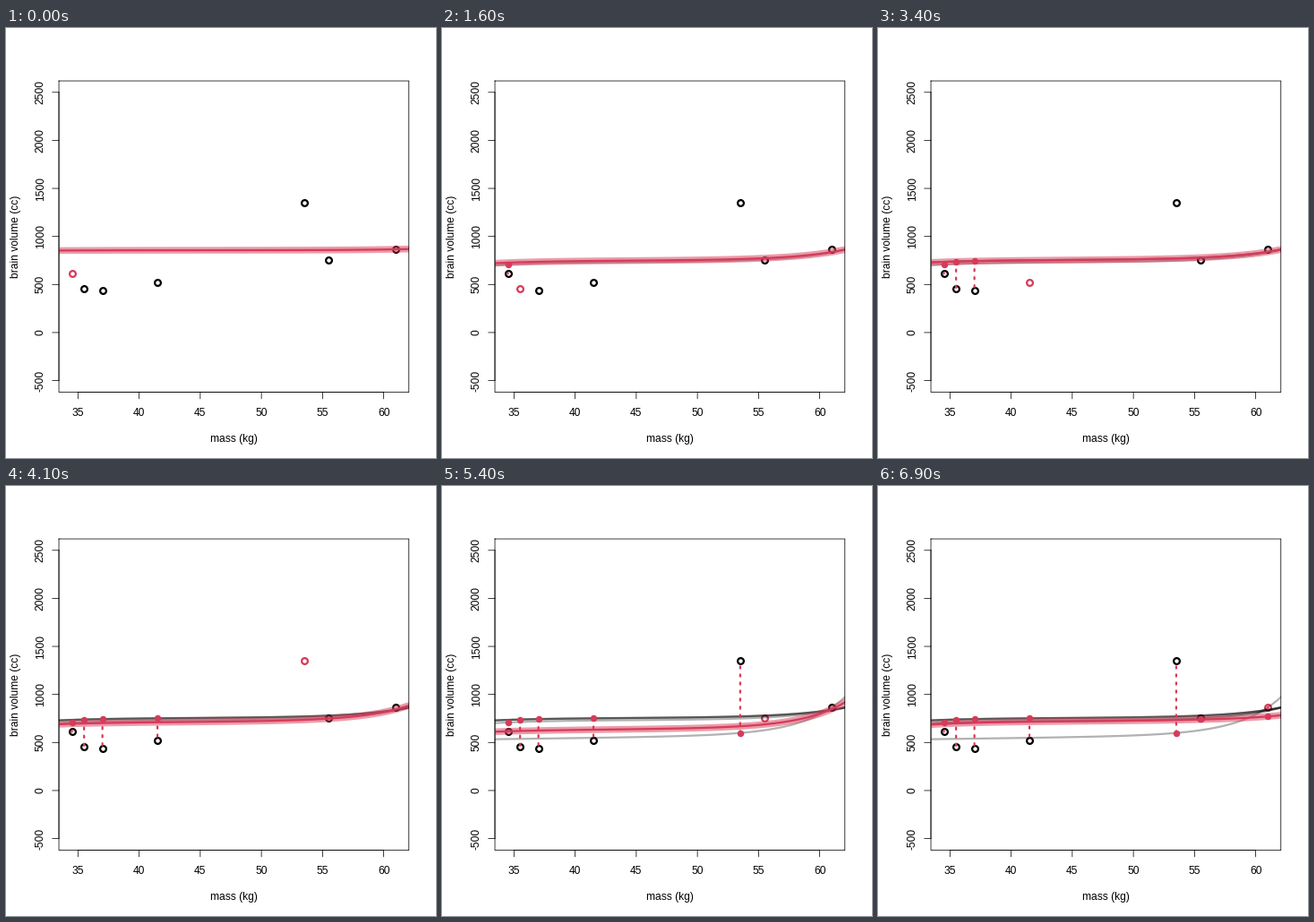
Write a matplotlib script that moves like this. It is 480 px wide and 480 px high and loops after 7 s.

```python
import matplotlib.pyplot as plt
import numpy as np
from matplotlib.animation import FuncAnimation
from matplotlib.patches import Rectangle

plt.rcParams["font.family"] = ["Liberation Sans", "DejaVu Sans"]

SIZE, DPI = 480, 80
PT = 72 / DPI                      # points per pixel
RED = "#d63b59"
THIN, THICK, BAND = 0.75, 2.25, 7.5
LEFT, RIGHT, TOP, BOTTOM = 59.04, 449.76, 59.04, 406.56
TICK = 7.2
X0, X1 = 33.44, 62.06
STEPS = 10                         # frames spent on each left-out point

MASS = [34.5, 35.5, 37, 41.5, 53.5, 55.5, 61]
BRAIN = [612, 452, 438, 521, 1350, 752, 871]

# start level, early bend, slope, tail height, tail width
FITS = [
    (701, 29, 0.2, 126, 4.1),
    (730, 21, 0.4, 102, 4.1),
    (730, 21, 0.4, 102, 4.1),
    (729, 20, 0.4, 103, 4.1),
    (534, 0, 1.7, 390, 3.4),
    (690, 28, 0.3, 138, 3.8),
    (686, 28, 0.6, 52, 4.3),
]


def px(mass):
    return LEFT + (np.asarray(mass) - X0) * (RIGHT - LEFT) / (X1 - X0)


def py(volume):
    return 339.94 - 0.10726 * np.asarray(volume)


def fit(i, x):
    level, bend, slope, tail, width = FITS[i]
    d = x - X0
    return (level + bend * (1 - np.exp(-d / 4)) + slope * d
            + tail * np.exp((x - X1) / width))


fig = plt.figure(figsize=(SIZE / DPI, SIZE / DPI), dpi=DPI, facecolor="white")
ax = fig.add_axes([0, 0, 1, 1])
ax.set_xlim(0, SIZE)
ax.set_ylim(SIZE, 0)
ax.axis("off")
plot_area = Rectangle((LEFT, TOP), RIGHT - LEFT, BOTTOM - TOP,
                      transform=ax.transData)


def stroke(xs, ys, width, color="black", **kw):
    return ax.plot(xs, ys, color=color, lw=width * PT, snap=False, **kw)[0]


def curve(ys, width, color="black", **kw):
    line = stroke(px(grid), py(ys), width, color, **kw)
    line.set_clip_path(plot_area)
    return line


def label(x, y, text, angle=0):
    ax.text(x, y, text, fontsize=12 * PT, rotation=angle, ha="center",
            va="baseline", rotation_mode="anchor")


# Box, axes and labels
stroke([LEFT, RIGHT, RIGHT, LEFT, LEFT],
       [TOP, TOP, BOTTOM, BOTTOM, TOP], THIN, zorder=9)
stroke(px([35, 60]), [BOTTOM, BOTTOM], THIN)
stroke([LEFT, LEFT], py([-500, 2500]), THIN)
for m in range(35, 61, 5):
    stroke([px(m)] * 2, [BOTTOM, BOTTOM + TICK], THIN)
    label(px(m), 433, str(m))
for v in range(-500, 2501, 500):
    stroke([LEFT - TICK, LEFT], [py(v)] * 2, THIN)
    label(41.8, py(v), str(v), 90)
label(254.4, 462, "mass (kg)")
label(13.6, 232.8, "brain volume (cc)", 90)

# Data, fitted curves and prediction errors
grid = np.linspace(X0, X1, 120)
levels = [np.full(grid.size, 870.0)] + [fit(i, grid) for i in range(len(FITS))]
rings, ghosts, errors, dots = [], [], [], []
for i, (m, v) in enumerate(zip(MASS, BRAIN)):
    x, guess = px(m), py(fit(i, m))
    rings.append(stroke([x], [py(v)], THIN, marker="o", ms=6.75 * PT,
                        mfc="none", mew=THICK * PT, zorder=3))
    ghosts.append(curve(levels[i + 1], THICK, alpha=0.3, zorder=4))
    errors.append(stroke([x, x], [guess, py(v)], THICK, RED, zorder=5,
                         ls=(0, (1, 3)), dash_capstyle="round"))
    dots.append(stroke([x], [guess], THIN, RED, marker="o", ms=7.5 * PT,
                       mew=0, zorder=8))

band = curve(levels[0], BAND, RED, alpha=0.5, zorder=6)
core = curve(levels[0], THICK, RED, zorder=7)


def update(frame):
    cur, step = divmod(frame, STEPS)
    p = (step + 1) / STEPS
    y = py((1 - p) * levels[cur] + p * levels[cur + 1])
    band.set_ydata(y)
    core.set_ydata(y)
    for i in range(len(MASS)):
        rings[i].set_markeredgecolor(RED if i == cur else "black")
        ghosts[i].set_visible(i < cur)
        done = i < cur or (i == cur and step == STEPS - 1)
        errors[i].set_visible(done)
        dots[i].set_visible(done)
    return rings + ghosts + errors + dots + [band, core]


anim = FuncAnimation(fig, update, frames=len(MASS) * STEPS, interval=100,
                     repeat=True, repeat_delay=0, blit=False)
plt.show()
```
